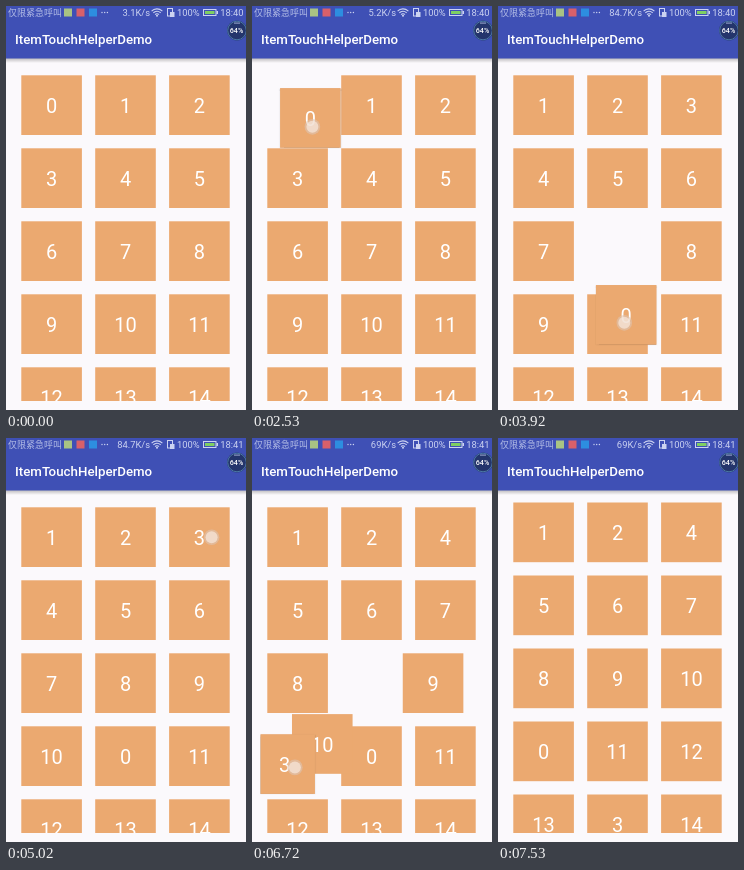
Write an HTML page with a canvas that moves like this. It is 240x404 px and loops after 8 s.

```html
<!DOCTYPE html>
<html lang="en">
<head>
<meta charset="utf-8">
<title>ItemTouchHelperDemo</title>
<style>
html, body { margin: 0; width: 100%; height: 100%; overflow: hidden; background: #fbf9fc; }
canvas { display: block; width: 240px; height: 404px; }
</style>
</head>
<body>
<canvas id="stage" width="240" height="404"></canvas>
<script>
const ctx = document.getElementById('stage').getContext('2d');
const LOOP = 8000, SETTLE = 250, LAG = 20;
const TILE = { w: 60.6, h: 59.7, color: '#eba970' };
const BAR = '#3f50b5', INK = '#ccd3f1';
const SANS = 'Roboto, "Noto Sans", sans-serif';

// Dragged tile positions over time: [ms, x, y]
const drags = [
  { item: 0, down: 1200, lift: 1700, release: 4160, grip: [31, 37], slot: 10,
    path: [[2210, 15.3, 69.3], [2530, 28, 82], [2800, 53, 118], [3010, 80, 165], [3200, 101, 219.5],
           [3450, 107, 252], [3700, 104, 272], [3860, 101, 278], [3920, 98, 279], [3980, 90, 282],
           [4080, 86, 288.5], [4160, 86, 288.5]] },
  { item: 3, down: 5020, lift: 5620, release: 7220, grip: [42.5, 30], slot: 13,
    path: [[5940, 163.1, 69.3], [6100, 143, 104], [6300, 100, 168], [6500, 48, 237], [6720, 2.5, 296],
           [6800, 2, 304], [6920, 16, 322], [7050, 60, 340], [7140, 88, 348], [7220, 91, 350]] }
];
const moves = [
  { at: 2995, from: 0, to: 4 }, { at: 3250, from: 4, to: 7 }, { at: 3985, from: 7, to: 10 },
  { at: 6220, from: 2, to: 4 }, { at: 6435, from: 4, to: 7 }, { at: 6654, from: 7, to: 9 },
  { at: 7110, from: 9, to: 13 }
];

const clamp = v => Math.max(0, Math.min(1, v));
const ease = v => 0.5 - 0.5 * Math.cos(Math.PI * clamp(v));
const mix = (a, b, k) => a + (b - a) * k;
const scrollAt = t => 4.8 * clamp((t - 6990) / 130);
const slotPos = (slot, scroll = 0) => [15.3 + (slot % 3) * 73.9, 69.3 + Math.floor(slot / 3) * 73 - scroll];

// Smooth curve through the timed points
function follow(path, t) {
  const last = path.length - 1;
  if (t <= path[0][0]) return path[0].slice(1);
  if (t >= path[last][0]) return path[last].slice(1);
  const i = path.findIndex(p => p[0] > t) - 1;
  const slope = (j, axis) => {
    if (j === 0 || j === last) return 0;
    const a = path[j - 1], b = path[j + 1];
    return (b[axis] - a[axis]) / (b[0] - a[0]);
  };
  const a = path[i], b = path[i + 1], span = b[0] - a[0], u = (t - a[0]) / span;
  return [1, 2].map(axis =>
    (1 + 2 * u) * (1 - u) ** 2 * a[axis] + u * (1 - u) ** 2 * span * slope(i, axis) +
    u * u * (3 - 2 * u) * b[axis] + u * u * (u - 1) * span * slope(i + 1, axis));
}

function tilePositions(t) {
  const order = Array.from({ length: 18 }, (_, i) => i);
  const pos = order.map(i => slotPos(i));
  for (const { at, from, to } of moves) {
    if (t < at) break;
    order.splice(to, 0, order.splice(from, 1)[0]);
    const k = ease((t - at) / SETTLE);
    for (let slot = from; slot <= to; slot++) {
      const item = order[slot], goal = slotPos(slot);
      pos[item] = pos[item].map((v, axis) => mix(v, goal[axis], k));
    }
  }
  const scroll = scrollAt(t);
  return pos.map(([x, y]) => [x, y - scroll]);
}

function text(str, x, y, size, { color = '#fff', align = 'left', weight = 400, family = SANS } = {}) {
  ctx.font = `${weight} ${size}px ${family}`;
  ctx.fillStyle = color;
  ctx.textAlign = align;
  ctx.fillText(str, x, y);
}

function rect(x, y, w, h, color) {
  ctx.fillStyle = color;
  ctx.fillRect(x, y, w, h);
}

function disc(x, y, r, color) {
  ctx.fillStyle = color;
  ctx.beginPath();
  ctx.arc(x, y, r, 0, 7);
  ctx.fill();
}

function drawTile(label, [x, y], raised) {
  ctx.save();
  if (raised) {
    ctx.shadowColor = 'rgba(0,0,0,.35)';
    ctx.shadowBlur = 1.5;
    ctx.shadowOffsetY = 0.5;
  }
  rect(x, y, TILE.w, TILE.h, TILE.color);
  ctx.restore();
  text(label, x + TILE.w / 2, y + TILE.h / 2 + 7.7, 20, { align: 'center' });
}

function drawList(t) {
  const pos = tilePositions(t);
  const drag = drags.find(d => t >= d.lift && t < d.release + SETTLE);
  if (drag) {
    const end = slotPos(drag.slot, scrollAt(t));
    const k = ease((t - drag.release) / SETTLE);
    pos[drag.item] = follow(drag.path, t).map((v, axis) => mix(v, end[axis], k));
  }
  ctx.save();
  ctx.beginPath();
  ctx.rect(8.5, 53, 223, 342);
  ctx.clip();
  pos.forEach((p, i) => { if (!drag || i !== drag.item) drawTile(i, p, false); });
  if (drag) drawTile(drag.item, pos[drag.item], true);
  ctx.restore();
}

function drawTouch(t) {
  const drag = drags.find(d => t >= d.down && t < d.release);
  if (!drag) return;
  const [x, y] = follow(drag.path, t + LAG);
  const cx = x + drag.grip[0], cy = y + drag.grip[1];
  disc(cx, cy, 7.8, 'rgba(222,196,178,.6)');
  disc(cx, cy, 6, 'rgba(246,232,222,.7)');
}

function drawWifi(x, y) {
  ctx.strokeStyle = INK;
  ctx.lineWidth = 1.1;
  for (const r of [2.6, 5, 7.4]) {
    ctx.beginPath();
    ctx.arc(x, y, r, -Math.PI * 0.76, -Math.PI * 0.24);
    ctx.stroke();
  }
  disc(x, y - 0.6, 1, INK);
}

function drawStatus(t) {
  const ink = { color: INK };
  text('仅限紧急呼叫', 2, 9.6, 9, { color: '#b4bde6', family: '"Noto Sans CJK SC", "Noto Sans CJK", sans-serif' });
  rect(58, 2.5, 8, 8, '#a9c383');
  rect(70.5, 2.5, 8, 8, '#d8606a');
  rect(83, 2.5, 8, 8, '#2d8ee0');
  for (const x of [96, 98.7, 101.4]) disc(x, 6.5, 0.7, INK);
  const speed = t < 680 ? '3.1K/s' : t < 3500 ? '5.2K/s' : t < 6300 ? '84.7K/s' : '69K/s';
  text(speed, 144, 9.8, 9.4, { color: INK, align: 'right' });
  drawWifi(151, 10.3);
  if (t > 7000) rect(145.5, 7.5, 1.2, 2.5, INK);
  ctx.strokeStyle = INK;
  ctx.lineWidth = 1;
  ctx.strokeRect(161.5, 2.5, 5, 7.5);
  rect(164, 6, 4.5, 5, INK);
  text('100%', 171, 9.8, 9.4, ink);
  ctx.strokeRect(197.5, 3.5, 12.5, 6);
  rect(199, 5, 9.5, 3, '#7fcf62');
  rect(210.5, 5, 1.5, 3, INK);
  text(t < 4200 ? '18:40' : '18:41', 237.5, 9.8, 9.4, { color: INK, align: 'right' });
}

function drawBadge() {
  disc(231, 24.5, 10, '#24356c');
  ctx.strokeStyle = '#4b78a5';
  ctx.lineWidth = 1;
  ctx.beginPath();
  ctx.arc(231, 24.5, 9.3, 0, 7);
  ctx.stroke();
  rect(228, 16.5, 6, 1.2, '#8b9ac4');
  text('64%', 230.5, 27.3, 7.2, { align: 'center', weight: 500 });
}

function drawHeader(t) {
  const shade = ctx.createLinearGradient(0, 52, 0, 57);
  shade.addColorStop(0, 'rgba(0,0,0,.26)');
  shade.addColorStop(1, 'rgba(0,0,0,0)');
  rect(0, 52, 240, 5, shade);
  rect(0, 0, 240, 52.5, BAR);
  drawStatus(t);
  text('ItemTouchHelperDemo', 9, 38.3, 13.3, { weight: 500 });
  drawBadge();
}

function render(now) {
  const t = now % LOOP;
  rect(0, 0, 240, 404, '#fbf9fc');
  drawList(t);
  drawHeader(t);
  drawTouch(t);
}

const start = performance.now();
function tick() {
  render(performance.now() - start);
  requestAnimationFrame(tick);
}
tick();
</script>
</body>
</html>
```
